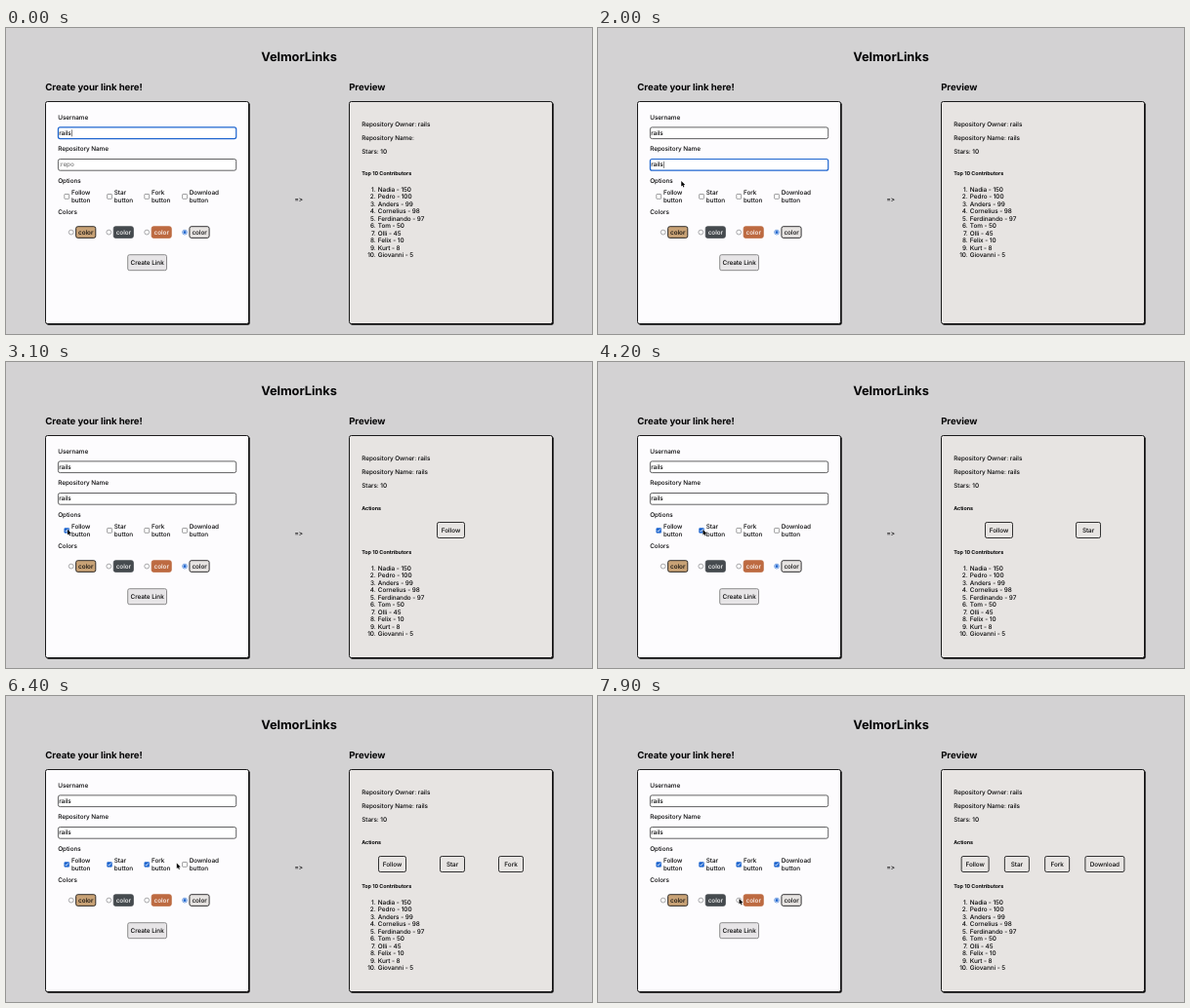
An HTML page with a canvas that plays this animation: 600x314 px, repeating every 8000 ms.

```html
<!DOCTYPE html>
<html lang="en">
<head>
<meta charset="utf-8">
<title>VelmorLinks</title>
<style>
html, body { margin: 0; width: 100%; height: 100%; overflow: hidden; background: #d3d2d3; }
canvas { display: block; width: 600px; height: 314px; }
</style>
</head>
<body>
<canvas id="stage"></canvas>
<script>
const LOOP = 8000, STEP = 100;
const INK = '#050506', BLUE = '#1f66cf', PAPER = '#fdfcfe', STONE = '#e7e4e2';
const canvas = document.getElementById('stage');
const ctx = canvas.getContext('2d');
const dpr = window.devicePixelRatio || 1;
canvas.width = 600 * dpr;
canvas.height = 314 * dpr;

const people = [
  ['Nadia', 150], ['Pedro', 100], ['Anders', 99], ['Cornelius', 98], ['Ferdinando', 97],
  ['Tom', 50], ['Olli', 45], ['Felix', 10], ['Kurt', 8], ['Giovanni', 5]
];
// label, checkbox centre x, time of the click, width of the preview button
const options = [
  ['Follow', 62.2, 3000, 28], ['Star', 106, 4200, 25],
  ['Fork', 144.2, 5300, 25], ['Download', 183, 7000, 40]
];
// radio centre x, fill, text colour, border
const colors = [
  [66.7, '#c8a276', INK, INK], [105.3, '#454a4e', '#fff', '#454a4e'],
  [144.2, '#bd6a41', '#fff', '#bd6a41'], [183, STONE, INK, INK]
];
const keys = [[900, 'r'], [1100, 'ra'], [1300, 'rai'], [1400, 'rail'], [1500, 'rails']];
// pointer moves: start time, end time, x, y reached
const moves = [
  [1900, 2500, 70, 168.4], [2600, 2700, 67.8, 170], [2700, 3000, 63, 171.8],
  [3200, 4100, 107.5, 172], [4300, 5200, 145.5, 172],
  [5900, 6800, 182, 171.4], [7200, 7900, 144.5, 208]
];

function text(s, x, y, size = 6.4, weight = 500, color = INK, align = 'left') {
  ctx.font = `${weight} ${size}px Inter, sans-serif`;
  ctx.fillStyle = color;
  ctx.textAlign = align;
  ctx.fillText(s, x, y);
  return ctx.measureText(s).width;
}

function box(x, y, w, h, r, fill, stroke, line = 0.8) {
  ctx.beginPath();
  ctx.roundRect(x, y, w, h, r);
  if (fill) { ctx.fillStyle = fill; ctx.fill(); }
  if (stroke) { ctx.strokeStyle = stroke; ctx.lineWidth = line; ctx.stroke(); }
}

function disc(x, y, r, fill, stroke) {
  ctx.beginPath();
  ctx.arc(x, y, r, 0, Math.PI * 2);
  ctx.fillStyle = fill;
  ctx.fill();
  if (stroke) { ctx.strokeStyle = stroke; ctx.lineWidth = 0.6; ctx.stroke(); }
}

function path(points, x, y) {
  ctx.beginPath();
  points.forEach(([px, py]) => ctx.lineTo(x + px, y + py));
}

function card(x, fill) {
  box(x + 1, 76.4, 208.2, 228.4, 2, '#050505');
  box(x, 75.5, 208, 228, 2, fill, INK, 0.9);
}

function input(y, value, focused, hint) {
  box(53.4, y, 182.3, 11.7, 2, '#fff', focused ? BLUE : '#3a3a3c', focused ? 1.2 : 0.8);
  const cy = y + 6;
  const w = value ? text(value, 54.2, cy) : (text(hint, 54.2, cy, 6.4, 500, '#777'), 0);
  if (focused) {
    ctx.fillStyle = INK;
    ctx.fillRect(54.5 + w, cy - 3.6, 0.5, 7);
  }
}

function checkbox(x, y, on) {
  box(x - 2.4, y - 2.4, 4.8, 4.8, 0.6, on ? BLUE : '#fff', on ? BLUE : '#606062', 0.6);
  if (!on) return;
  path([[-1.5, 0.1], [-0.5, 1.2], [1.5, -1.4]], x, y);
  ctx.strokeStyle = '#fff';
  ctx.lineWidth = 0.8;
  ctx.stroke();
}

function popup() {
  ctx.save();
  ctx.shadowColor = 'rgba(0,0,0,.28)';
  ctx.shadowBlur = 3 * dpr;
  ctx.shadowOffsetY = 0.6 * dpr;
  box(53, 148.6, 183, 20, 1, '#fff');
  ctx.restore();
  text('rails', 58, 158, 5.4);
}

function form(t, repo) {
  text('Create your link here!', 40.3, 61.2, 9.6, 700);
  card(40.5, PAPER);
  text('Username', 53.2, 91.8);
  input(101.9, 'rails', t < 400);
  text('Repository Name', 53.2, 124.4);
  input(134.5, repo, t >= 400 && t < 3000, ':repo');
  text('Options', 53.2, 156.7);
  for (const [name, x, click] of options) {
    checkbox(x, 172.9, t >= click);
    text(name, x + 4.7, 169.3);
    text('button', x + 4.7, 176.9);
  }
  text('Colors', 53.2, 189.2);
  colors.forEach(([x, fill, ink, edge], i) => {
    const on = i === 3;
    disc(x, 209.6, 2.4, '#fff', on ? BLUE : '#707072');
    if (on) disc(x, 209.6, 1.5, BLUE);
    box(x + 4.9, 203.7, 20.2, 11.7, 2, fill, edge);
    text('color', x + 15, 209.7, 6.4, 500, ink, 'center');
  });
  box(124.7, 232.7, 39.8, 16, 1.8, '#e7e5e7', '#727273');
  text('Create Link', 144.6, 240.7, 6.4, 500, INK, 'center');
  if (t >= 1000 && t < 1500) popup();
}

// Buttons share the free width evenly on both sides.
function actions(shown) {
  const used = shown.reduce((sum, o) => sum + o[3], 0);
  const gap = (183 - used) / shown.length / 2;
  let x = 364;
  text('Actions', 364.2, 150, 5.4, 700);
  for (const [name, , , w] of shown) {
    x += gap;
    box(x, 164.5, w, 16, 1.8, null, INK);
    text(name, x + w / 2, 172.6, 6.4, 500, INK, 'center');
    x += w + gap;
  }
}

function preview(t, repo) {
  text('Preview', 351.2, 61.2, 9.6, 700);
  card(351.5, STONE);
  text('Repository Owner: rails', 364.2, 98.7);
  text('Repository Name: ' + repo, 364.2, 112.6);
  text('Stars: 10', 364.2, 127);
  const shown = options.filter(o => t >= o[2]);
  if (shown.length) actions(shown);
  const top = shown.length ? 46 : 0;
  text('Top 10 Contributors', 364.2, 149.8 + top, 5.4, 700);
  people.forEach(([name, n], i) => {
    const y = 166 + top + i * 7.48;
    text(i + 1 + '.', 378.6, y, 6.4, 500, INK, 'right');
    text(`${name} - ${n}`, 380.8, y);
  });
}

function pointer(t) {
  if (t < 2000) return;
  let x = 92, y = 152;
  for (const [from, to, mx, my] of moves) {
    const p = Math.min(1, Math.max(0, (t - from) / (to - from)));
    const e = 1 - (1 - p) ** 2;
    x += (mx - x) * e;
    y += (my - y) * e;
  }
  path([[0, 0], [0, 5.6], [1.3, 4.5], [2.2, 6.5], [3.1, 6.1], [2.2, 4.2], [3.9, 4.1]], x, y);
  ctx.closePath();
  ctx.strokeStyle = '#fff';
  ctx.lineWidth = 0.6;
  ctx.stroke();
  ctx.fillStyle = '#000';
  ctx.fill();
}

function draw(now) {
  const t = Math.floor((now % LOOP) / STEP) * STEP;
  const repo = keys.reduce((s, [at, value]) => t >= at ? value : s, '');
  ctx.setTransform(dpr, 0, 0, dpr, 0, 0);
  ctx.textBaseline = 'middle';
  ctx.textRendering = 'geometricPrecision';
  ctx.letterSpacing = '-0.05px';
  ctx.fillStyle = '#d3d2d3';
  ctx.fillRect(0, 0, 600, 314);
  text('VelmorLinks', 300, 30, 12.8, 700, INK, 'center');
  // Two calls keep the font from joining the signs into an arrow.
  text('=', 299.8, 175.6, 6.4, 500, INK, 'right');
  text('>', 299.8, 175.6);
  form(t, repo);
  preview(t, repo);
  pointer(t);
}

const start = performance.now();
function tick() {
  draw(performance.now() - start);
  requestAnimationFrame(tick);
}
tick();
</script>
</body>
</html>
```
